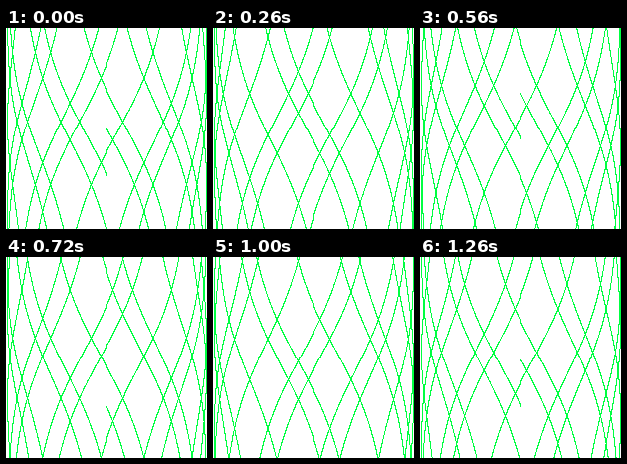
Animation, 201 px wide and 201 px high, one loop 1.28 s. Source, as an HTML page with a canvas:

```html
<!DOCTYPE html>
<html lang="en">
<head>
<meta charset="utf-8">
<title>Tangent curve</title>
<style>
  html, body { margin: 0; width: 100%; height: 100%; overflow: hidden; background: #fff; }
  canvas { display: block; width: 201px; height: 201px; image-rendering: pixelated; }
</style>
</head>
<body>
<canvas id="stage" width="201" height="201"></canvas>
<script>
const R = 100, SIZE = 2 * R + 1;
const CYCLES = 5, STEP = 0.001, FREQ = 3 * 0.6046602879796196;
const FRAMES = 64, DELAY = 20, PHASE_STEP = 0.1;
const WHITE = 0xffffffff, GREEN = 0xff41ff00; // ABGR

const ctx = document.getElementById('stage').getContext('2d');
const image = ctx.createImageData(SIZE, SIZE);
const pixels = new Uint32Array(image.data.buffer);
const toPixel = v => R + Math.trunc(v * R + 0.5);

function draw(frame) {
  const phase = frame * PHASE_STEP;
  pixels.fill(WHITE);
  for (let t = 0; t < CYCLES * 2 * Math.PI; t += STEP) {
    const x = toPixel(Math.sin(t));
    const y = toPixel(Math.tan(t * FREQ + phase));
    if (y >= 0 && y < SIZE) pixels[y * SIZE + x] = GREEN;
  }
  ctx.putImageData(image, 0, 0);
}

const start = performance.now();
let shown = -1;

function tick() {
  const elapsed = Math.max(0, performance.now() - start);
  const frame = Math.floor(elapsed / DELAY) % FRAMES;
  if (frame !== shown) draw(shown = frame);
  requestAnimationFrame(tick);
}
tick();
</script>
</body>
</html>
```
